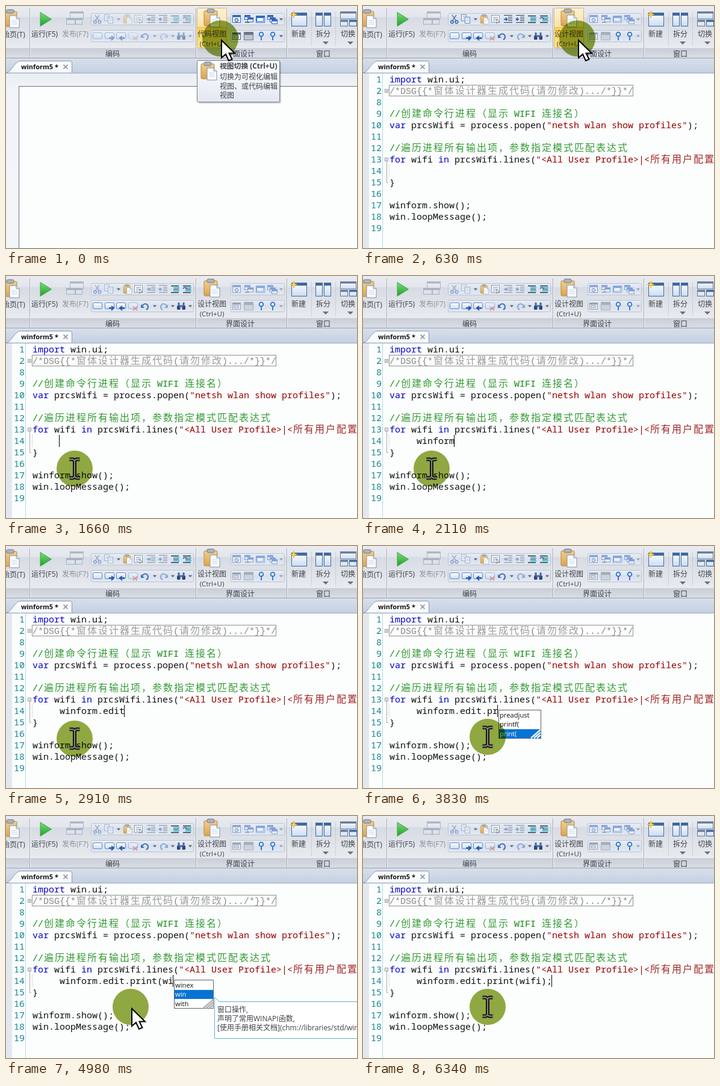
Animation of 583x402 px, one loop 6900 ms. Source, as an HTML page:

```html
<!DOCTYPE html>
<html lang="zh">
<head>
<meta charset="utf-8">
<title>Code editor</title>
<style>
html, body { margin: 0; width: 100%; height: 100%; overflow: hidden; background: #fff; }
svg { display: block; width: 583px; height: 402px; }
text { white-space: pre; }
.ui { font: 12px "Open Sans", "Noto Sans CJK SC", "Noto Sans CJK", sans-serif; fill: #3c4148; }
.mid { text-anchor: middle; }
.list { font-size: 11.2px; fill: #111; }
.code { font: 15px "Noto Sans Mono", monospace; }
.note { font: 15px "Liberation Mono", monospace; }
.han { font: 300 16px "Noto Sans CJK SC", "Noto Sans CJK", sans-serif; letter-spacing: 2px; fill-opacity: .85; }
</style>
</head>
<body>
<svg id="stage" viewBox="0 0 583 402" xmlns="http://www.w3.org/2000/svg"></svg>
<script>
const esc = s => s.replace(/&/g, '&amp;').replace(/</g, '&lt;');
const text = (x, y, s, cls = 'ui', more = '') => `<text x="${x}" y="${y}" class="${cls}" ${more}>${esc(s)}</text>`;
const label = (x, y, s, more) => text(x, y, s, 'ui mid', more);
const rect = (x, y, w, h, fill, stroke = 'none', more = '') =>
  `<rect x="${x}" y="${y}" width="${w}" height="${h}" fill="${fill}" stroke="${stroke}" ${more}/>`;
const path = (d, stroke, w = 1, fill = 'none', more = '') =>
  `<path d="${d}" fill="${fill}" stroke="${stroke}" stroke-width="${w}" ${more}/>`;
const group = (id, body, more = '') => `<g id="${id}" ${more}>${body}</g>`;
const at = (x, y, body, s = 1) => `<g transform="translate(${x} ${y}) scale(${s})">${body}</g>`;
const all = icons => icons.map(i => at(...i)).join('');
const fade = (id, stops) => `<linearGradient id="${id}" x2="0" y2="1">` +
  stops.map(([o, c]) => `<stop offset="${o}" stop-color="${c}"/>`).join('') + '</linearGradient>';

// Code text sits on a grid of 9 x 19 pixel cells; Chinese characters take two cells
const CELL = 9, LEFT = 44;
const base = row => 127 + row * 19;
function code(row, col, s, fill, cls = 'code') {
  let x = LEFT + col * CELL, out = '';
  for (const run of s.match(/[\u2e80-\uffef]+|[^\u2e80-\uffef]+/g)) {
    const han = run.charCodeAt(0) > 0x2e7f;
    out += text(han ? x + 1 : x, base(row), run, han ? 'han' : cls, `fill="${fill}"`);
    x += run.length * CELL * (han ? 2 : 1);
  }
  return out;
}

// Icons, centred on 0,0
const win = (x, y, w, h, line = '#5a84c4', fill = '#f4f8ff') =>
  rect(x + .5, y + .5, w, h, fill, line) + rect(x + 1, y + 1, w - 1, h > 12 ? 4 : 2.5, line);
const drop = (x, y) => path(`M${x - 3} ${y - 1.5}h6l-3 3.5z`, 'none', 0, '#59616e');
const bigDrop = (x, y) => path(`M${x - 5} ${y - 2}h10l-5 5z`, 'none', 0, '#6b6f77');
const clipboard =
  rect(-13, -12, 22, 25, 'url(#board)', '#b9853a', 'rx="2"') +
  rect(-8, -15, 12, 6, '#aeb4bd', '#727a86', 'rx="2"') +
  path('M-3 -5h11l5 5v15h-16z', '#8391a6', 1, '#fbfdff') + path('M8 -5v5h5', '#8391a6', 1, '#dce6f2') +
  path('M0 3h9M0 6h10M0 9h10', '#c4d1e2');
const bigWin = (x, y, w, h, line) => win(x, y, w, h, line, 'url(#pane)');
const star = path('M0 -6L1.5 -1.5L6 0L1.5 1.5L0 6L-1.5 1.5L-6 0L-1.5 -1.5z', '#e0a520', .6, '#ffd84a');
const scissors = path('M-4 -7L3 3M3 -7L-4 3', '#60779a', 1.4) +
  '<g fill="none" stroke="#3565b5" stroke-width="1.6"><circle cx="-4" cy="4.500" r="2.300"/><circle cx="3.500" cy="4.500" r="2.300"/></g>';
const page = (x, y) => rect(x, y, 8, 10, '#f7faff', '#6283b5') + path(`M${x + 2} ${y + 3}h4M${x + 2} ${y + 6}h4`, '#82a2d0');
const copy = page(-7.5, -7.5) + page(-1.5, -3.5);
const select = rect(-7.5, -6.5, 13, 12, '#f5f8fc', '#647387', 'stroke-dasharray="2 1"') +
  path('M-5 -3h8M-5 0h8M-5 3h4', '#7c90ad') + path('M1 0v7l2 -2h3z', '#333', .6, '#fff');
const lines = (arrow, tint) => path('M-7 -6.500h14M0 -3.500h7M0 -.5h7M0 2.500h7M-7 5.500h14', '#333b48', 1.2) + path(arrow, tint, 1.8);
const listing = path('M-7 -5.500h13M-7 5.500h13', '#2b3340', 1.4) + path('M-3 -2.500h10M-3 2.500h10', '#35bfd0', 2) + path('M-3 0h9', '#2b3340');
const mark = rect(-7.5, -5.5, 15, 10, 'url(#pane)', '#5f89c8', 'rx="1.5"');
const bend = path('M-5 1C-4 -5 5 -6 5 2Q5 4 2 6', '#426eb5', 2.2) + path('M-7 -3v6h6z', 'none', 0, '#426eb5');
const pale = body => `<g opacity=".5">${body}</g>`;
const flip = body => `<g transform="scale(-1 1)">${body}</g>`;
const glasses = rect(-7, -1, 5.5, 7, '#2f4778', 'none', 'rx="1.5"') + rect(1.5, -1, 5.5, 7, '#2f4778', 'none', 'rx="1.5"') +
  path('M-4 -6v6M4 -6v6M-3 0h6', '#4a689f', 3);
const pin = '<circle cy="-3" r="3.300" fill="#fff" stroke="#3b7ad0" stroke-width="2"/>' + path('M0 0v7', '#3b7ad0', 2);
const small = (x, y) => win(x, y, 9, 7, '#2f63b8');

const bar = (x, y, w) => rect(x + .5, y + .5, w, 19, 'url(#bar)', '#bcc3cf', 'rx="2"');
const sep = x => path(`M${x + .5} 4V86`, '#a5abb6') + path(`M${x + 1.5} 4V86`, '#f6f7f9');
const thin = x => path(`M${x + .5} 10V66`, '#bfc4cd', 1, 'none', 'stroke-dasharray="2 1"');

const blockIcons = all([
  [152, 22, scissors], [171, 22, copy],
  [241, 22, lines('M-7 0h5M-4 -2.500l2.500 2.500l-2.500 2.500', '#356ac0')],
  [261, 22, lines('M-2 0h-5M-4 -2.500l-2.500 2.500l2.500 2.500', '#356ac0')]
]);
const editIcons = all([
  [202, 22, clipboard, .52], [221, 22, select], [281, 22, listing],
  [301, 22, listing + path('M-7 -1q3 -4 6 0', '#2b62b4', 1.6)],
  [152, 50, mark],
  [172, 50, mark + path('M-1 3h6M3 0l4 3l-4 4', '#2458ae', 2)],
  [191, 50, mark + path('M6 3h-7M2 0l-4 3l4 4', '#2458ae', 2)],
  [211, 50, pale(mark + path('M0 1l7 6M7 1l-7 6', '#d7473d', 2))],
  [231, 50, bend], [262, 50, pale(flip(bend))], [291, 50, glasses]
]) + drop(187, 22) + drop(247, 50) + drop(277, 50) + drop(306, 50);

const gear = '<circle cy="1.500" r="2.500" fill="none" stroke="#1f4fa0" stroke-width="2" stroke-dasharray="1.600 .8"/>';
const formIcons = all([
  [383, 22, win(-7, -7, 13, 12, '#2f63b8') + gear],
  [403, 22, small(-7, -7) + small(-2, -3) + path('M-6 5h7', '#444', 1.5)],
  [422, 22, win(-7, -6, 14, 11, '#2f6bd0') + rect(-5.5, -2.5, 11, 6, '#fff', '#2f6bd0')],
  [442, 22, small(-8, -7) + small(-4, -3) + small(-1, 0)],
  [382, 50, win(-6, -6, 13, 11, '#56617a') + rect(-3, -1, 7, 4, '#d8e1ef', '#56617a')],
  [402, 50, win(-7, -7, 15, 13, '#6f7885', '#bcc5d2')]
]) + drop(457, 22) + drop(457, 50);

const ribbon = rect(0, 0, 583, 88, 'url(#ribbon)') + rect(0, 70, 583, 16, 'url(#foot)') +
  rect(0, 87, 583, 24, 'url(#tabs)') + path('M0 86.500H583', '#9aa3b1') +
  sep(39) + sep(315) + sep(466) + thin(507) + thin(547) +
  at(9, 21, clipboard) + text(-6, 52, '始页(T)') +
  path('M57 10.500L75.500 22L57 33.500z', '#3fa648', 1, 'url(#go)') + text(42, 51, '运行(F5)') +
  pale(bigWin(106, 9, 22, 12, '#7e8795') + bigWin(100, 20, 14, 10, '#7e8795') + bigWin(115, 20, 11, 10, '#7e8795')) +
  text(93, 51, '发布(F7)', 'ui', 'style="fill:#8c929b"') +
  bar(141, 12, 170) + bar(141, 40, 170) + bar(373, 12, 89) + bar(373, 40, 89) +
  group('block', blockIcons) + group('edit', editIcons) + group('form', formIcons) + at(424, 50, pin) + at(443, 50, pin) +
  group('hover', rect(317.5, 3.5, 49, 66, 'url(#gold)', '#d6b566', 'rx="2"') + path('M318 35.500h49', '#e5bd53')) +
  at(342, 20, clipboard) + label(342, 51, '', 'id="mode"') + label(342, 67, '(Ctrl+U)', 'style="font-size:11.5px"') +
  bigWin(474, 11, 25, 22, '#40699f') + at(478, 14, star) + label(486, 51, '新建') +
  bigWin(514, 11, 11, 22, '#40699f') + bigWin(528, 11, 11, 22, '#40699f') + label(527, 51, '拆分') + bigDrop(531, 61) +
  bigWin(555, 9, 26, 12, '#6b7c94') + bigWin(555, 23, 12, 10, '#6b7c94') + bigWin(570, 23, 12, 10, '#40699f') +
  label(568, 51, '切换') + bigDrop(572, 61) +
  label(177, 84, '编码') + label(389, 84, '界面设计') + label(527, 84, '窗口') +
  path('M0 110.500H2C8 110 15 91.500 24 91.500H107Q109.500 91.500 109.500 94V110.500', '#8797ad', 1, 'url(#tab)') +
  text(25, 105, 'winform5 *', 'ui', 'style="font-size:11px;font-weight:700;fill:#111"') +
  path('M95.500 97.500l7 7M102.500 97.500l-7 7', '#8a8f98', 1.7) + path('M0 111.500H583', '#9aa8ba');

const formView = rect(0, 112, 583, 290, 'url(#desk)') + rect(21.5, 133.5, 570, 280, '#fcfefd', '#69737f');

const BLUE = '#0000c4', BLACK = '#101010', RED = '#930000', GREEN = '#128a12', GRAY = '#8a8a8a';
const numbers = [1, 2, 8, 9, 10, 11, 12, 13, 14, 15, 16, 17, 18, 19]
  .map((n, i) => text(31, base(i), String(n), 'code', 'fill="#12858f" text-anchor="end"')).join('');
const fold = (y, plus) => rect(36.5, y - 2.5, 5, 5, '#fff', '#9a9a9a') + path(`M38 ${y}h2` + (plus ? `M39 ${y - 1}v2` : ''), '#666', .8);
const codeView = rect(0, 112, 583, 290, '#fcfdfd') + rect(0, 112, 10, 290, '#e3e8ef') + path('M32.500 112V402', '#b4dbe2') + numbers +
  code(0, 0, 'import', BLUE) + code(0, 7, 'win.ui;', BLACK) +
  rect(43.5, 131.5, 405, 18, 'none', '#8f8f8f') + code(1, 0, '/*DSG{{*窗体设计器生成代码(请勿修改).../*}}*/', GRAY, 'note') +
  code(3, 0, '//创建命令行进程（显示 WIFI 连接名）', GREEN, 'note') +
  code(4, 0, 'var', BLUE) + code(4, 4, 'prcsWifi = process.popen(', BLACK) +
  code(4, 29, '"netsh wlan show profiles"', RED) + code(4, 55, ');', BLACK) +
  code(6, 0, '//遍历进程所有输出项，参数指定模式匹配表达式', GREEN, 'note') +
  code(7, 0, 'for', BLUE) + code(7, 4, 'wifi', BLACK) + code(7, 9, 'in', BLUE) + code(7, 12, 'prcsWifi.lines(', BLACK) +
  code(7, 27, '"<All User Profile>|<所有用户配置', RED) +
  code(9, 0, '}', BLACK) + code(11, 0, 'winform.show();', BLACK) + code(12, 0, 'win.loopMessage();', BLACK) +
  fold(141, true) + fold(255, false) + path('M39.500 258V293.500H42', '#aaa') +
  path('M43.500 264V284', '#999', 1, 'none', 'stroke-dasharray="1 2"') +
  text(89, base(8), '', 'code', `id="typed" fill="${BLACK}"`) + rect(0, 0, 1, 20, '#000', 'none', 'id="caret"');

function popup(x, w, items, pick) {
  const grip = pick === 2 ? '#e7f2ff' : '#b4b4b4', r = x + w;
  return rect(x + .5, 272.5, w, 47, '#fff', '#5c6066') + rect(x + 1, 273.5 + pick * 15.4, w - 1, 15, '#0873d2') +
    items.map((s, i) => text(x + 2, 285 + i * 15.4, s, 'ui list', i === pick ? 'style="fill:#fff"' : '')).join('') +
    path(`M${r - 16} 319L${r} 305M${r - 11} 319L${r} 309.500M${r - 6} 319L${r} 314`, grip, 2.5);
}
const help = path('M346.500 301.500L355 308.500H590V369.500H346.500z', '#5eb2d3', 1, '#fff') +
  text(351, 326, '窗口操作,') + text(351, 341, '声明了常用WINAPI函数,') + text(351, 356, '[使用手册相关文档](chm://libraries/std/win.h');
const tip = rect(319, 92, 138, 70, '#000', 'none', 'rx="3" opacity=".18"') +
  rect(317.5, 90.5, 137, 69, 'url(#paper)', '#767b84', 'rx="2"') + at(337, 108, clipboard) +
  text(355, 104, '视图切换 (Ctrl+U)', 'ui', 'style="font-weight:700;font-size:11.8px"') +
  ['切换为可视化编辑', '视图、或代码编辑', '视图'].map((s, i) => text(355, 122 + i * 15.7, s)).join('');

const arrow = path('M2 3V32L9 26L14 37L19.500 34.500L14.500 24.500H24z', '#000', 2, '#fff', 'stroke-linejoin="miter"');
const stem = 'M-8.500 -15.500H-3L0 -13.500L3 -15.500H8.500M0 -15V15M-8.500 15.500H-3L0 13.500L3 15.500H8.500';
const beam = path(stem, '#151515', 6) + path(stem, '#8d8f86', 1.8);

const $ = id => document.getElementById(id);
$('stage').innerHTML = '<defs>' +
  fade('ribbon', [[0, '#e9ebf0'], [.2, '#e3e6ec'], [.22, '#d7dbe3'], [.8, '#e8ebef'], [1, '#dfe2e8']]) +
  fade('foot', [[0, '#c9cdd6'], [1, '#dadde4']]) + fade('tabs', [[0, '#d7dfeb'], [1, '#c4d0e2']]) +
  fade('tab', [[0, '#fff'], [1, '#f4f8fd']]) + fade('bar', [[0, '#e9eef6'], [.5, '#d8e0ec'], [1, '#e4eaf3']]) +
  fade('gold', [[0, '#fbf1d9'], [.48, '#f9e3a7'], [.5, '#ffd34f'], [1, '#ffe48c']]) +
  fade('go', [[0, '#7ddb76'], [1, '#1fa02f']]) + fade('board', [[0, '#f3cf8a'], [1, '#dda44e']]) +
  fade('pane', [[0, '#fff'], [1, '#c9dcf3']]) + fade('paper', [[0, '#fff'], [1, '#e2e7f1']]) +
  fade('desk', [[0, '#e9eef4'], [.1, '#f1f4f8'], [1, '#f3f6f9']]) + '</defs>' +
  group('formView', formView) + group('codeView', codeView) + ribbon + group('tip', tip) +
  group('listPr', popup(225, 70, ['preadjust', 'printf(', 'print('], 2)) +
  group('listWi', popup(279, 65, ['winex', 'win', 'with'], 1) + help) +
  group('mouse', '<circle r="30" fill="#91a941" style="mix-blend-mode:multiply"/>' + group('arrow', arrow) + group('beam', beam));

// Each entry: start time, then only what changes from there on
const LOOP = 6900, LINE = 'winform.edit.print(wifi);';
const steps = [
  [0, { code: 0, block: 0, tip: 1, hover: 1, beam: 0, x: 356, y: 54, len: 0, row: 8, caret: 0, list: '' }],
  [110, { tip: 0 }],
  [630, { code: 1, block: 1 }],
  [740, { hover: 0, x: 270, y: 117 }],
  [880, { beam: 1, x: 185, y: 180 }],
  [1430, { row: 9, caret: 1 }],
  [1660, { block: 0, row: 8, x: 114, y: 320 }],
  [1770, { len: 2 }], [1880, { len: 4 }], [2000, { len: 6 }], [2110, { len: 7 }],
  [2450, { len: 8 }], [2560, { len: 9 }], [2680, { len: 10 }], [2790, { len: 11 }], [2910, { len: 12 }],
  [3370, { len: 13, x: 207, y: 317 }],
  [3830, { len: 15, list: 'listPr' }],
  [4280, { len: 19, list: '' }],
  [4980, { len: 21, list: 'listWi', beam: 0 }],
  [5090, { len: 23, list: '' }],
  [5310, { len: 25, beam: 1 }],
  [5770, { caret: 0 }],
  [6340, { caret: 1 }]
];

const show = (id, on) => { $(id).style.display = on ? '' : 'none'; };
const dim = (id, on) => $(id).setAttribute('opacity', on ? .5 : 1);
function draw(time) {
  const s = {};
  for (const [start, change] of steps) if (start <= time) Object.assign(s, change);
  show('formView', !s.code);
  show('codeView', s.code);
  show('tip', s.tip);
  show('hover', s.hover);
  show('arrow', !s.beam);
  show('beam', s.beam);
  show('caret', s.caret);
  for (const id of ['listPr', 'listWi']) show(id, s.list === id);
  dim('block', !s.block);
  dim('edit', !s.code);
  dim('form', s.code);
  $('mode').textContent = s.code ? '设计视图' : '代码视图';
  $('typed').textContent = LINE.slice(0, s.len);
  $('caret').setAttribute('x', s.row === 9 ? 52 : 88 + s.len * CELL);
  $('caret').setAttribute('y', s.row === 9 ? 283 : 264);
  $('mouse').setAttribute('transform', `translate(${s.x} ${s.y})`);
}

const begin = performance.now();
function tick() {
  draw((performance.now() - begin) % LOOP);
  requestAnimationFrame(tick);
}
tick();
</script>
</body>
</html>
```
